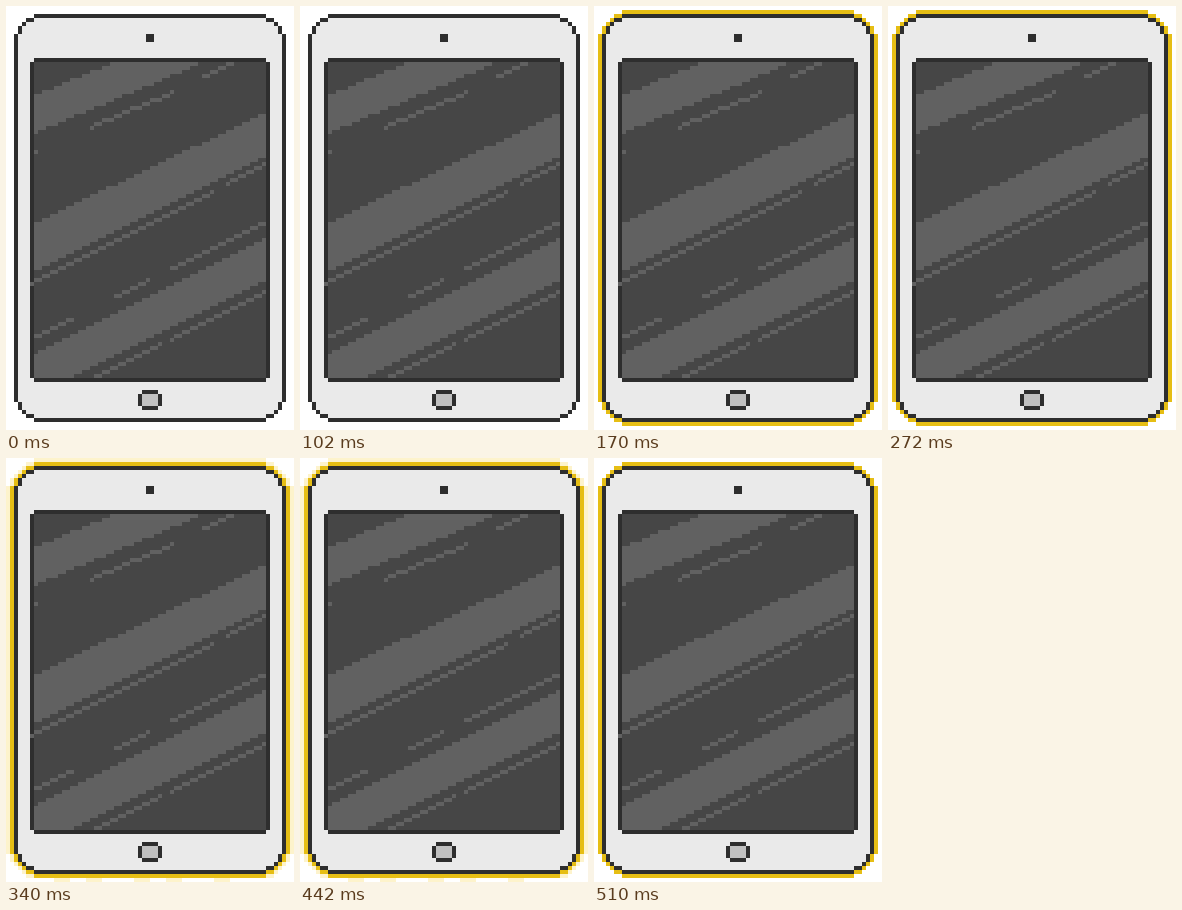
Animation, 288 px wide and 424 px high, one loop 0.68 s. Source, as an HTML page with a canvas:

```html
<!DOCTYPE html>
<html>
<head>
<meta charset="utf-8">
<title>Tablet</title>
<style>
html, body { margin: 0; width: 100%; height: 100%; overflow: hidden; background: #fff; }
canvas { display: block; }
</style>
</head>
<body>
<canvas width="288" height="424"></canvas>
<script>
const ctx = document.querySelector('canvas').getContext('2d');
const INK = '#2e2e2e', SHELL = '#eaeaea', SCREEN = '#464646', SHINE = '#616161';
const BUTTON = '#c0c0c0', GOLD = '#e6be14', GLOW = '#fdf3cc';
ctx.scale(4, 4); // one unit is one art pixel

function box(x, y, w, h, color) {
  ctx.fillStyle = color;
  ctx.fillRect(x, y, w, h);
}

// Box with stepped circular corners of radius r
function rounded(x, y, w, h, r, color) {
  for (let row = 0; row < h; row++) {
    const d = Math.max(0, r - 0.5 - Math.min(row, h - 1 - row));
    const inset = Math.round(r - Math.sqrt(r * r - d * d));
    box(x + inset, y + row, w - 2 * inset, 1, color);
  }
}

// Stepped diagonal: row at column x for height c and slope
const diagonal = (x, c, slope) => Math.floor(c - slope * x);

function band(c1, slope1, c2, slope2) {
  for (let x = 7; x < 65; x++) {
    const top = Math.max(14, diagonal(x, c1, slope1));
    const end = Math.min(93, diagonal(x, c2, slope2));
    if (end > top) box(x, top, 1, end - top, SHINE);
  }
}

function streak(from, to, c, slope = 0.5) {
  for (let x = from; x <= to; x++) box(x, diagonal(x, c, slope), 1, 1, SHINE);
}

function reflections() {
  band(25.7, 0.42, 35.13, 0.42);
  streak(7, 7, 39.1, 0.42);
  streak(21, 41, 39, 0.42);
  streak(49, 56, 42);

  band(57.8, 0.474, 70, 0.5);
  streak(6, 51, 72);
  streak(55, 64, 71.5);

  streak(7, 16, 86);
  streak(27, 35, 86);
  streak(41, 64, 86);

  band(90.5, 0.5, 101, 0.5);
  streak(22, 38, 103.5);
  streak(41, 64, 103.5);
}

function body(x, y, color) {
  rounded(x, y, 68, 102, 7.5, color);
}

function tablet() {
  body(2, 2, INK);
  rounded(3, 3, 66, 100, 6, SHELL);
  box(35, 7, 2, 2, INK);
  rounded(6, 13, 60, 81, 2, INK);
  box(7, 14, 58, 79, SCREEN);
  reflections();
  rounded(33, 96, 6, 5, 2, INK);
  box(34, 97, 4, 3, BUTTON);
}

// Body silhouette grown by n art pixels
function halo(n, color) {
  for (let dx = -n; dx <= n; dx++) {
    const dy = n - Math.abs(dx);
    body(2 + dx, 2 - dy, color);
    body(2 + dx, 2 + dy, color);
  }
}

// Pale halo with a broken bottom edge
function glow() {
  halo(2, GLOW);
  ctx.clearRect(0, 105, 72, 1);
  for (let x = 12; x < 56; x += 20) {
    box(x, 105, 4, 1, GLOW);
    if (x < 50) box(x + 8, 105, 4, 1, GLOW);
  }
}

function draw(time) {
  const step = Math.floor(time % 680 / 170);
  ctx.clearRect(0, 0, 72, 106);
  if (step === 2) glow();
  if (step > 0) halo(1, GOLD);
  tablet();
}

const start = performance.now();
function tick() {
  draw(performance.now() - start);
  requestAnimationFrame(tick);
}
tick();
</script>
</body>
</html>
```
